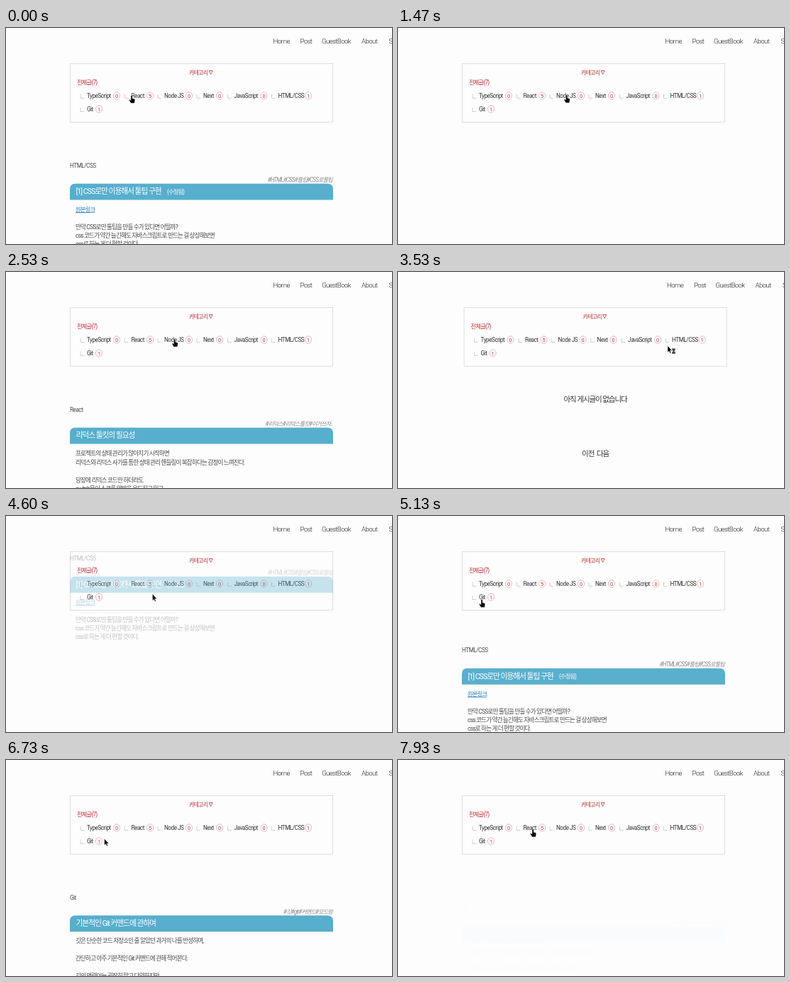
Recreate the animation shown at these times as an HTML page. Size 544 by 306 pixels, loop 8000 ms.

```html
<!DOCTYPE html>
<html lang="ko">
<head>
<meta charset="utf-8">
<title>Category posts</title>
<style>
  html, body { margin: 0; width: 100%; height: 100%; overflow: hidden; background: #fdfdfd; }
  svg { display: block; width: 544px; height: 306px; }
  text { font-family: Roboto, "Noto Sans CJK KR", "Noto Sans CJK", sans-serif; fill: #333; white-space: pre; }
  .latin { letter-spacing: -.06em; }
  .ko { letter-spacing: -.1em; }
  .nav { font-weight: 300; fill: #222; }
  .red { fill: #b8323e; }
  .body { fill: #484848; }
  .title { fill: #fff; }
  .tag { fill: #888; font-style: italic; text-anchor: end; }
  .link { fill: #2b7cb8; text-decoration: underline; }
  .mid { text-anchor: middle; }
  .code { font-family: "Liberation Serif", "Noto Serif", "Noto Sans CJK KR", serif; letter-spacing: -.04em; fill: #444; }
</style>
</head>
<body>
<svg id="stage" viewBox="0 0 544 306">
  <g id="page">
    <g id="nav"></g>
    <g id="box">
      <rect x="90.5" y="50.5" width="370" height="83" fill="none" stroke="#dedede"/>
      <path d="M286 60.5h5.2l-2.6 5z" fill="none" stroke="#b8323e" stroke-width=".8"/>
    </g>
    <g id="html"></g>
    <g id="react"></g>
    <g id="git"></g>
    <g id="empty"></g>
  </g>
  <g id="cursor">
    <path id="hand" d="M-1 1a1.1 1.1 0 0 1 2.2 0V4.2L4 5Q5 5.3 4.8 6.6L4 11H-1L-3.4 7Q-3.6 5.4-2.3 5.9L-1 7Z" fill="#000" stroke="#fff" stroke-width=".4"/>
    <path id="arrow" d="M0 0V9.2L2 7.4 3.5 10.6 4.9 10 3.5 6.8H6.2Z" fill="#000" stroke="#fff" stroke-width=".4"/>
    <path id="glass" d="M6 4.5h5M6 10.6h5M6.8 5v1L8.5 7.5 6.8 9v1.3h3.4V9L8.5 7.5 10.2 6V5z" fill="#555" stroke="#222" stroke-width=".8"/>
  </g>
</svg>
<script>
const LOOP = 8000, RISE = 200, DROP = 16, EXIT = 300;
const $ = id => document.getElementById(id);

function add(parent, tag, attrs) {
  const el = document.createElementNS('http://www.w3.org/2000/svg', tag);
  for (const k in attrs) el.setAttribute(k, attrs[k]);
  parent.append(el);
  return el;
}

// y is the middle of the line
function write(parent, str, x, y, size, cls) {
  add(parent, 'text', { x, y: y + size * .36, 'font-size': size, class: cls }).textContent = str;
}

[['Home', 376.5], ['Post', 414.5], ['GuestBook', 445], ['About', 501], ['Search', 539.5]]
  .forEach(([s, x]) => write($('nav'), s, x, 19, 9.6, 'latin nav'));

write($('box'), '카테고리', 258, 63, 8, 'ko red');
write($('box'), '전체글(7)', 100, 77, 8.3, 'ko red');

const categories = [
  ['TypeScript', 114, 96, 156, 0], ['React', 176.5, 96, 203, 5], ['Node JS', 223, 96, 258, 0],
  ['Next', 278, 96, 301, 0], ['JavaScript', 321.5, 96, 363.5, 0], ['HTML/CSS', 383.5, 96, 426, 1],
  ['Git', 114, 115, 131, 1]
];
for (const [name, x, y, cx, count] of categories) {
  add($('box'), 'path', { d: `M${x - 9} ${y - 2}v5.5h5`, fill: 'none', stroke: '#c4c4c4', 'stroke-width': .8 });
  write($('box'), name, x, y, 8.2, 'latin');
  add($('box'), 'ellipse', { cx, cy: y, rx: 4.6, ry: 5.2, fill: 'none', stroke: '#e2a9b3', 'stroke-width': .8 });
  write($('box'), count, cx, y, 7.4, 'mid red');
}

function post(id, label, tags, title, lines) {
  const g = $(id);
  write(g, label, 90, 195, 8.2, 'latin body');
  write(g, tags, 460, 215, 8.1, 'ko tag');
  add(g, 'path', { d: 'M90 243.5V228.5q0-8 8-8H453q8 0 8 8v15z', fill: '#57aecd' });
  write(g, title, 98.5, 231.5, 10.8, 'ko title');
  for (const [y, str, cls = 'ko body', size = 8.6] of lines) write(g, str, 98, y, size, cls);
}

post('html', 'HTML/CSS', '#HTML#CSS#툴팁#CSS로툴팁', '[1] CSS로만 이용해서 툴팁 구현', [
  [257, '원본링크', 'ko link', 8.3],
  [281.5, '만약 CSS로만 툴팁을 만들 수가 있다면 어떨까?'],
  [294, 'css 코드가 약간 늘긴해도 자바스크립트로 만드는 걸 상상해보면'],
  [306, 'css로 하는 게 더 편할 것이다.']
]);
write($('html'), '(수정됨)', 227, 232, 8.2, 'ko title');

post('react', 'React', '#리덕스#리덕스툴킷#이거쓰자..', '리덕스 툴킷의 필요성', [
  [257, '프로젝트의 상태 관리가 많아지기 시작하면'],
  [269.5, '리덕스와 리덕스 사가를 통한 상태 관리 핸들링이 복잡하다는 감정이 느껴진다.'],
  [294.5, '당장에 리덕스 코드만 하더라도'],
  [307, 'switch문이 스크롤 압박을 유도하고 있고'],
  [319.5, '사가까지 추가되면 더 하면 더 했지 덜 하진 않아지니깐..']
]);

post('git', 'Git', '#깃#git#커맨드#모드랑', '기본적인 Git 커맨드에 관하여', [
  [256.5, '깃은 단순한 코드 저장소인 줄 알았던 과거의 나를 반성하며,'],
  [281.5, '간단하고 아주 기본적인 Git 커맨드에 관해 적어본다.'],
  [306.5, '깃의 명령어는 굉장히 많고 다양하지만,'],
  [331, '자주 사용하는 명령어 위주로 정리했다.'],
  [359, 'git add <파일> / git add .', 'code', 13]
]);

write($('empty'), '아직 게시글이 없습니다', 275.5, 180, 10.5, 'ko mid');
write($('empty'), '이전', 256.5, 257, 10.5, 'ko');
write($('empty'), '다음', 277.3, 257, 10.5, 'ko');

// id, enter start, enter duration, exit start
const shows = [
  ['html', -2000, 900, 1070],
  ['react', 1640, 900, 2670],
  ['empty', 2950, 550, 4070],
  ['html', 4490, 900, 5670],
  ['git', 5920, 900, 7670]
];

// time, x, y of the pointer tip, shape from then on
const moves = [
  [0, 177, 95.5, 'hand'], [200, 177, 95.5, 'hand'], [870, 190, 97, 'hand'],
  [1100, 190, 97, 'arrow'], [1430, 237.5, 95, 'hand'], [2670, 237.5, 95, 'hand'],
  [2800, 241, 97, 'arrow'], [3000, 262, 104, 'wait'], [3530, 380, 104.5, 'wait'],
  [3800, 399, 93, 'hand'], [4100, 399, 93, 'arrow'], [4900, 118, 118.5, 'hand'],
  [6530, 118, 118.5, 'arrow'], [7070, 184, 96, 'hand'], [7330, 190, 98, 'hand'],
  [LOOP, 190, 98, 'hand']
];

const clamp = v => Math.min(1, Math.max(0, v));
const out = (u, power) => 1 - (1 - clamp(u)) ** power;

function drawPosts(t) {
  for (const id of ['html', 'react', 'git', 'empty']) {
    const show = shows.find(s => s[0] === id && t >= s[1] && t < s[3] + EXIT);
    const g = $(id);
    g.style.display = show ? '' : 'none';
    if (!show) continue;
    const enter = out((t - show[1]) / show[2], 3);
    const exit = out((t - show[3]) / EXIT, 2);
    g.setAttribute('transform', `translate(0 ${DROP * exit - RISE * (1 - enter)})`);
    g.setAttribute('opacity', enter * (1 - exit));
  }
  // the short page has no scrollbar, so it sits further right
  const short = t >= 2950 && t < 4490;
  $('page').setAttribute('transform', `translate(${short ? 2.6 : 0} 0)`);
}

function drawCursor(t) {
  const i = moves.findIndex(m => m[0] > t) - 1;
  const [t0, x0, y0, shape] = moves[i], [t1, x1, y1] = moves[i + 1];
  const u = (t - t0) / (t1 - t0), k = u * u * (3 - 2 * u);
  $('cursor').setAttribute('transform', `translate(${x0 + (x1 - x0) * k} ${y0 + (y1 - y0) * k})`);
  $('hand').style.display = shape === 'hand' ? '' : 'none';
  $('arrow').style.display = shape === 'hand' ? 'none' : '';
  $('glass').style.display = shape === 'wait' ? '' : 'none';
}

const start = performance.now();
function tick(now) {
  const t = Math.max(0, now - start) % LOOP;
  drawPosts(t);
  drawCursor(t);
  requestAnimationFrame(tick);
}
tick(start);
</script>
</body>
</html>
```
